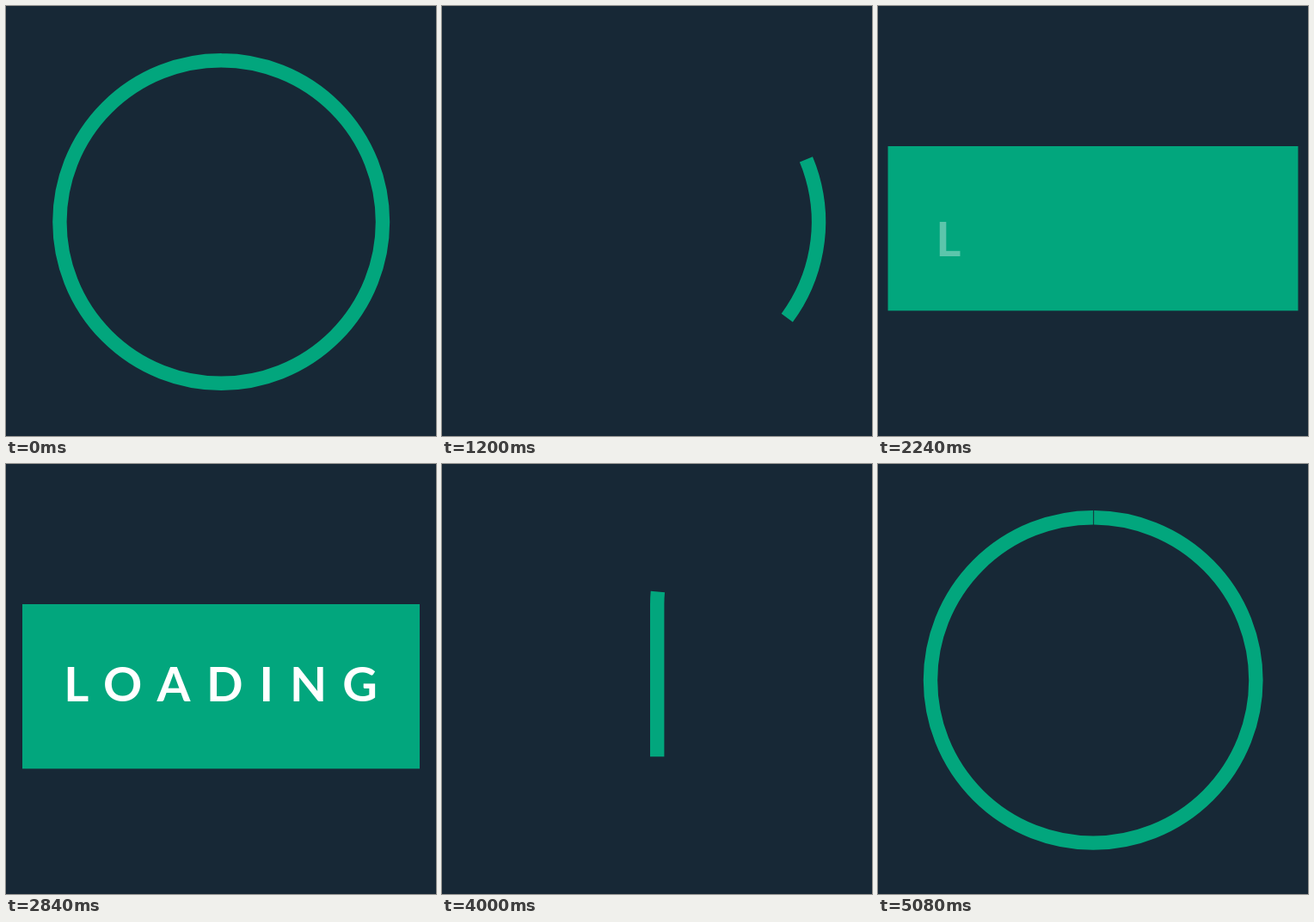
An HTML page that plays this animation: 500x500 px, repeating every 5120 ms.

```html
<!DOCTYPE html>
<html lang="en">
<head>
<meta charset="utf-8">
<title>Loading</title>
<style>
  html, body { margin: 0; width: 100%; height: 100%; overflow: hidden; background: #172836; }
  svg { display: block; width: 100vw; height: 100vh; }
  path { fill: none; stroke: #02a67d; stroke-width: 16.4; }
  rect { fill: #02a67d; }
  text { font: 700 56px Lato, sans-serif; fill: #fff; text-anchor: middle; }
</style>
</head>
<body>
<svg viewBox="0 0 500 500">
  <path id="intro"/>
  <path id="outro"/>
  <rect id="panel" y="163" height="191.3"/>
  <g id="word"></g>
</svg>
<script>
const LOOP = 5120;
const CX = 250.2, TOP = 163, BOTTOM = 354.3, LINE = BOTTOM - TOP;
const $ = id => document.getElementById(id);
const intro = $('intro'), outro = $('outro'), panel = $('panel'), word = $('word');

const turn = r => `a${r} ${r} 0 0 1 0 ${2 * r}a${r} ${r} 0 0 1 0 ${-2 * r}`;

// Two turns of the ring, then a tighter arc that leads up into the centre line.
const R1 = 187.8, CY1 = 251;
const drop = BOTTOM - CY1;
const bend = (R1 * R1 - drop * drop) / (2 * R1);
const reach = R1 / (R1 - bend);
intro.setAttribute('d', `M${CX} ${CY1 - R1}${turn(R1)}${turn(R1)}` +
  `A${R1} ${R1} 0 0 1 ${CX + bend * reach} ${CY1 + drop * reach}` +
  `A${bend} ${bend} 0 0 1 ${CX} ${BOTTOM}V${TOP}`);

// The line curls out at its top and joins a slightly larger ring.
const R2 = 189.2, CY2 = 251.4, diag = R2 * Math.SQRT1_2;
outro.setAttribute('d', `M${CX} ${BOTTOM}V${TOP}` +
  `C${CX} 71 326 60 ${CX + diag} ${CY2 - diag}` +
  `A${R2} ${R2} 0 1 1 ${CX} ${CY2 - R2}${turn(R2)}`);

const introLen = intro.getTotalLength(), outroLen = outro.getTotalLength();
const ring1 = 2 * Math.PI * R1, ring2 = 2 * Math.PI * R2;

const letters = [...'LOADING'].map((c, i) => {
  const el = document.createElementNS('http://www.w3.org/2000/svg', 'text');
  el.textContent = c;
  el.setAttribute('x', [81.7, 135.5, 195, 254.4, 302.8, 351.5, 411.6][i]);
  word.append(el);
  return el;
});

const span = (t, a, b) => Math.min(1, Math.max(0, (t - a) / (b - a)));
const mix = (a, b, p) => a + (b - a) * p;
const inOut = p => p < 0.5 ? 2 * p * p : 1 - 2 * (1 - p) ** 2;
const sineInOut = p => (1 - Math.cos(Math.PI * p)) / 2;
const cubicOut = p => 1 - (1 - p) ** 3;

// Smooth curve through [time, value] keys, at rest at both ends.
function track(keys, t) {
  const last = keys.length - 1;
  if (t <= keys[0][0]) return keys[0][1];
  if (t >= keys[last][0]) return keys[last][1];
  const i = keys.findIndex(k => k[0] > t) - 1;
  const slope = n => n === 0 || n === last ? 0 :
    (keys[n + 1][1] - keys[n - 1][1]) / (keys[n + 1][0] - keys[n - 1][0]);
  const [t0, v0] = keys[i], [t1, v1] = keys[i + 1];
  const d = t1 - t0, p = (t - t0) / d, q = 1 - p;
  return v0 * q * q * (1 + 2 * p) + v1 * p * p * (3 - 2 * p) +
    d * p * q * (slope(i) * q - slope(i + 1) * p);
}

const headKeys = [[90, ring1], [720, 570.6 / 360 * ring1], [1200, 2772], [1770, introLen]];
const tailKeys = [[90, 0], [720, 463.5 / 360 * ring1], [1200, 2578], [1770, introLen - LINE]];

function trim(path, tail, head, opacity) {
  path.style.opacity = opacity;
  path.style.strokeDasharray = `0 ${tail} ${head - tail} 9999`;
}

function draw(t) {
  const swap = span(t, 1820, 1910);
  trim(intro, track(tailKeys, t), track(headKeys, t), 1 - swap);

  const head = span(t, 3940, 5080) ** 1.75;
  const tail = inOut(span(t, 3920, 5080));
  trim(outro, tail * (outroLen - ring2), mix(LINE, outroLen, head), t < 3720 ? 0 : 1);

  let w = mix(17, 477.5, sineInOut(span(t, 1830, 2220)));
  w = mix(w, 462, sineInOut(span(t, 2230, 2320)));
  w = mix(w, 16.4, inOut(span(t, 3700, 3940)));
  panel.setAttribute('x', CX - 0.2 - w / 2);
  panel.setAttribute('width', w);
  panel.style.opacity = t < 3940 ? swap : 0;

  word.style.opacity = 1 - span(t, 3700, 3820);
  letters.forEach((el, i) => {
    const start = 2200 + i * 55;
    const p = cubicOut(span(t, start, start + 300));
    el.setAttribute('y', 276 + 23 * (1 - p));
    el.style.opacity = p;
  });
}

const begin = performance.now();
function tick() {
  draw((performance.now() - begin) % LOOP);
  requestAnimationFrame(tick);
}
tick();
</script>
</body>
</html>
```
